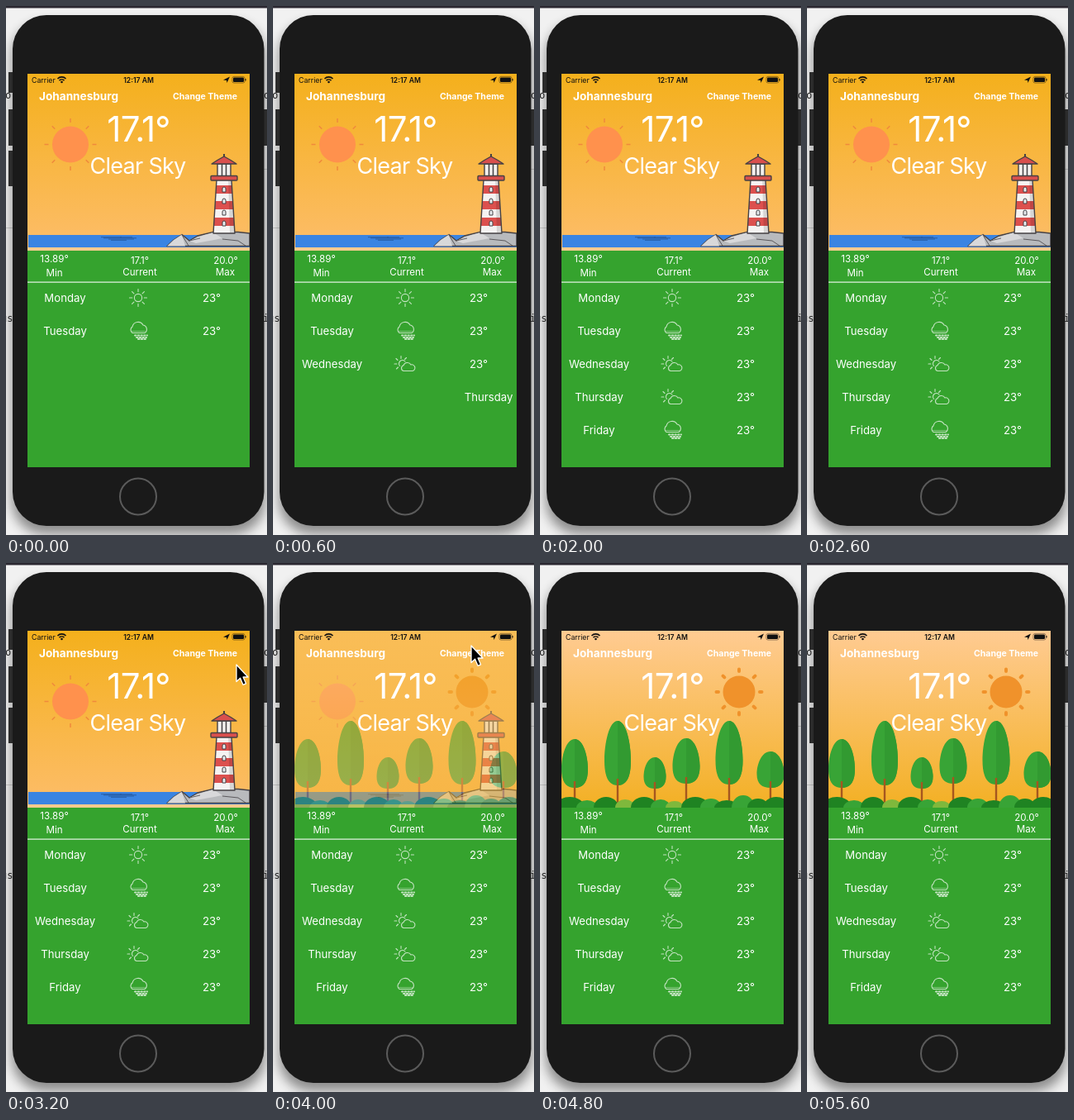
Recreate the animation shown at these times as an HTML page. Size 316 px wide and 640 px high, loop 5.7 s.

```html
<!DOCTYPE html>
<html lang="en">
<meta charset="utf-8">
<title>Weather</title>
<style>
  html, body { margin: 0; height: 100%; overflow: hidden; background: #f1f1f1; }
  svg { display: block; width: 100vw; height: 100vh; font-family: Inter, Roboto, sans-serif; }
  .mid { text-anchor: middle; }
  .line { fill: none; stroke: #fff; stroke-width: 1.1; stroke-linecap: round; opacity: .7; }
  .ink { stroke: #454144; stroke-width: 1.4; stroke-linejoin: round; }
</style>
<svg viewBox="0 0 316 640">
  <defs>
    <linearGradient id="day" x2="0" y2="1"><stop stop-color="#f4b01c"/><stop offset="1" stop-color="#fdbd6a"/></linearGradient>
    <linearGradient id="dusk" x2="0" y2="1"><stop stop-color="#ffcb92"/><stop offset="1" stop-color="#f3b024"/></linearGradient>
    <clipPath id="screen"><rect x="26" y="82" width="269" height="476"/></clipPath>
    <clipPath id="sky"><rect x="26" y="82" width="269" height="214"/></clipPath>
    <clipPath id="tower"><path d="M255 210H273L277 275H251Z"/></clipPath>
    <filter id="blur" x="-20%" y="-20%" width="140%" height="140%"><feGaussianBlur stdDeviation="7"/></filter>
  </defs>

  <!-- desk behind the phone -->
  <rect width="316" height="640" fill="#f1f1f1"/>
  <path d="M0 268.5H9M307 197.5H316" stroke="#ccc"/>
  <rect x="7" y="20" width="307" height="619" rx="40" opacity=".42" filter="url(#blur)"/>
  <rect width="316" height="2.5" fill="#2a2730"/>
  <g font-family="DejaVu Sans Mono, monospace" font-size="12" fill="#222">
    <text x="-1" y="112">o</text><text x="-6" y="382">us</text>
    <text x="312" y="112">o</text><text x="311" y="382">i</text>
  </g>
  <path d="M3 80H10V105H3ZM3 125H10V169H3ZM3 175H10V218H3ZM311 125H316V169H311Z" fill="#2b2b2b"/>
  <rect x="8" y="11" width="304.5" height="618" rx="41" fill="#1a1a1a"/>
  <circle cx="160" cy="593.5" r="22" fill="none" stroke="#5b5b5b" stroke-width="2"/>

  <g clip-path="url(#screen)">
    <rect x="26" y="82" width="269" height="476" fill="#35a32e"/>

    <g clip-path="url(#sky)">
      <rect x="26" y="82" width="269" height="214" fill="url(#day)"/>
      <circle cx="78" cy="167.5" r="22" fill="#ff914d"/>
      <g id="seaSun" stroke="#f0893c" stroke-width="1.5"></g>
      <path d="M27 277H295V292H27Z" fill="#3a84e2"/>
      <path d="M26 292H295V296H26Z" fill="#f6cb8e"/>
      <path d="M115 279.7H140M118 280.8H158M124 282H155M127 283.3H146M138 279.8H153" stroke="#24589f" stroke-width=".9"/>
      <g class="ink">
        <path d="M195 290.5L203 283 213 276.5 222 284 232 278 251 273.5H281L295 275V290.5Z" fill="#b8babd"/>
        <path d="M195 290.5L203 283 213 276.5 217 290.5ZM222 284L240 277 251 274 262 281 230 287Z" fill="#d8d8da" stroke="none"/>
        <path d="M213 277L221 290M222 284L235 281M262 282L281 284 290 290" fill="none" stroke-width=".8"/>
        <g clip-path="url(#tower)" stroke="none">
          <path d="M249 205H279V276H249Z" fill="#f5f3f2"/>
          <path d="M249 217H279V227H249ZM249 236H279V246H249ZM249 256H279V266H249Z" fill="#dc504e"/>
          <path d="M269 206H273L277 275H271Z" fill="#000" opacity=".12"/>
        </g>
        <path d="M255 210H273L277 275H251Z" fill="none"/>
        <path d="M256 191H272V206H256Z" fill="#f3f0ee"/>
        <path d="M261.500 191V206M266.500 191V206" stroke-width="1.500"/>
        <path d="M249 191L256 186.500 264 182 272 186.500 279 191Z" fill="#d94f4d"/>
        <path d="M264 179V182" stroke-width="2"/>
        <rect x="248" y="205.500" width="32" height="5.500" rx="1" fill="#d94f4d"/>
        <g id="panes" fill="#e9edf0"></g>
      </g>

      <g id="woods">
        <rect x="26" y="82" width="269" height="214" fill="url(#dusk)"/>
        <circle cx="241" cy="156" r="19.5" fill="#f0922b"/>
        <g id="woodSun" stroke="#f0922b" stroke-width="4" stroke-linecap="round"></g>
        <g id="trees"></g>
        <g id="bushes"></g>
      </g>
    </g>

    <!-- status bar -->
    <g fill="#111">
      <text x="31" y="92.5" font-size="8.8">Carrier</text>
      <text class="mid" x="160.5" y="92.5" font-size="8.6" font-weight="600">12:17 AM</text>
      <path d="M263 89.5L271 85.5 267.5 93 267 90Z"/>
      <rect x="275" y="86.5" width="13" height="5.5" rx="1.2"/>
      <rect x="273.9" y="85.4" width="15.2" height="7.7" rx="2.2" fill="none" stroke="#111" stroke-width=".7" opacity=".6"/>
      <path d="M290 88V90.5" stroke="#111"/>
      <path d="M62.5 88A7 7 0 0 1 72.5 88M64.5 90.2A4.3 4.3 0 0 1 70.5 90.2" fill="none" stroke="#111" stroke-width="1.6"/>
      <circle cx="67.5" cy="92" r="1.3"/>
    </g>

    <g fill="#fff">
      <text x="40" y="114" font-size="13.6" font-weight="700">Johannesburg</text>
      <text x="280" y="113" font-size="10.5" font-weight="700" text-anchor="end">Change Theme</text>
      <text class="mid" x="160.5" y="164" font-size="42" letter-spacing="-.8">17.1°</text>
      <text class="mid" x="159.5" y="203" font-size="27" letter-spacing="-.7">Clear Sky</text>
      <g class="mid" font-size="11.6">
        <text x="58.5" y="310">13.89°</text><text x="58.5" y="327">Min</text>
        <text x="162" y="312">17.1°</text><text x="162" y="325.5">Current</text>
        <text x="266" y="312">20.0°</text><text x="265.5" y="325.5">Max</text>
      </g>
      <path d="M26 333.5H295V334.7H26Z" opacity=".85"/>
      <g id="rows" class="mid" font-size="13.2"></g>
    </g>
  </g>

  <path id="cursor" d="M0 0V20.5L4.6 16.3 8 24.3 11.5 22.8 8.1 15H14Z" fill="#000" stroke="#fff" stroke-width="1.3" stroke-linejoin="round"/>
</svg>

<script>
  const LOOP = 5700, STEP = 100;
  const el = id => document.getElementById(id);
  const clamp = x => Math.min(1, Math.max(0, x));
  const ease = x => (x = clamp(x)) * x * (3 - 2 * x);

  function rays(cx, cy, from, to) {
    let d = '';
    for (let i = 0; i < 8; i++) {
      const c = Math.cos(i * Math.PI / 4), s = Math.sin(i * Math.PI / 4);
      d += `M${cx + c * from} ${cy + s * from}L${cx + c * to} ${cy + s * to}`;
    }
    return `<path d="${d}"/>`;
  }

  const icons = {
    sun: `<circle r="4.6"/>${rays(0, 0, 7.2, 10.5)}`,
    rain: `<path d="M-7 2.5A4.5 4.5 0 0 1-7-5A7 7 0 0 1 6-7A5.2 5.2 0 0 1 8 2.5Z"/>
      <path d="M-8 .5H8" opacity=".5"/>
      <path d="M-4 5.5H11M-2 8H10M0 10H9" stroke-width="2" stroke-dasharray="1.5 2.2"/>`,
    cloudy: `<path d="M-2 8.5A3.5 3.5 0 0 1-2 1.8A5 5 0 0 1 7 1A3.8 3.8 0 0 1 9 8.5Z"/>
      <path d="M-6.5 2.5A4 4 0 1 1 0-3M-5-6.5V-9.5M-9-4.5L-11-6.5M-10 0H-13M-8.5 4L-10.5 6M-.5-5.5L1.5-7.5"/>`
  };

  const days = [['Monday', 'sun'], ['Tuesday', 'rain'], ['Wednesday', 'cloudy'], ['Thursday', 'cloudy'], ['Friday', 'rain']];
  el('rows').innerHTML = days.map(([day, icon], i) => `<g>
    <text x="71.5" y="${358 + 40 * i}">${day}</text>
    <g class="line" transform="translate(160 ${353 + 40 * i})">${icons[icon]}</g>
    <text x="249" y="${358 + 40 * i}">23°</text></g>`).join('');

  el('seaSun').innerHTML = rays(78, 167.5, 26.5, 31.5);
  el('woodSun').innerHTML = rays(241, 156, 25, 27.5);
  el('panes').innerHTML = [222, 236, 250, 263].map(y =>
    `<path d="M262 ${y + 3}V${y - 1}A2 2 0 0 1 266 ${y - 1}V${y + 3}Z" stroke-width="1"/>`).join('');

  // centre, top, bottom, half width
  const trees = [[42, 213, 272, 16], [94, 191, 269, 16], [139, 235, 273, 13.5],
    [177, 212, 267, 16.5], [229, 191, 268, 16.5], [279, 228, 272, 16.5]];
  el('trees').innerHTML = trees.map(([x, top, low, w]) => {
    const h = low - top, half = side => {
      const e = x + side * w;
      return `M${x} ${top}C${x + side * w * .65} ${top} ${e} ${top + h * .35} ${e} ${top + h * .62}
        C${e} ${top + h * .9} ${x + side * w * .6} ${low} ${x} ${low}Z`;
    };
    return `<path d="${half(-1)}${half(1)}" fill="#38a436"/><path d="${half(1)}" fill="#329a31"/>
      <path d="M${x} ${low - 8}V292" stroke="#a5561f" stroke-width="2.4"/>`;
  }).join('');

  // centre, half width, height, colour
  const bushes = [[36, 18, 13, '#1f8322'], [57, 13, 9, '#38a436'], [80, 15, 13, '#1f8322'], [103, 12, 10, '#7fb83c'],
    [126, 16, 13, '#1f8322'], [146, 12, 10, '#38a436'], [163, 11, 8, '#7fb83c'], [188, 17, 13, '#1f8322'],
    [207, 13, 11, '#38a436'], [226, 15, 9, '#1f8322'], [246, 14, 15, '#38a436'], [264, 13, 11, '#1f8322'], [286, 16, 13, '#1f8322']];
  el('bushes').innerHTML = bushes.map(([x, w, h, fill]) =>
    `<ellipse cx="${x}" cy="296" rx="${w}" ry="${h}" fill="${fill}"/>`).join('');

  // time, x, y
  const path = [[2800, 332, 172], [3200, 279, 123], [3600, 240, 100], [4300, 240, 100], [4700, 332, 64]];
  function pointer(t) {
    const i = path.findIndex(p => p[0] > t);
    if (i < 1) return path[0];
    const [a, b] = [path[i - 1], path[i]], k = (t - a[0]) / (b[0] - a[0]);
    return a.map((v, j) => v + (b[j] - v) * k);
  }

  const rows = [...el('rows').children];
  function draw(now) {
    const t = Math.floor(now % LOOP / STEP) * STEP;
    rows.forEach((row, i) => {
      const start = i < 2 ? -1000 : (i - 2) * 420;
      row.setAttribute('transform', `translate(${269 * (1 - ease((t - start) / 500))} 0)`);
    });
    el('woods').setAttribute('opacity', ease((t - 3600) / 800));
    const [, x, y] = pointer(t);
    el('cursor').setAttribute('transform', `translate(${x} ${y})`);
    requestAnimationFrame(() => draw(performance.now()));
  }
  draw(0);
</script>
</html>
```
